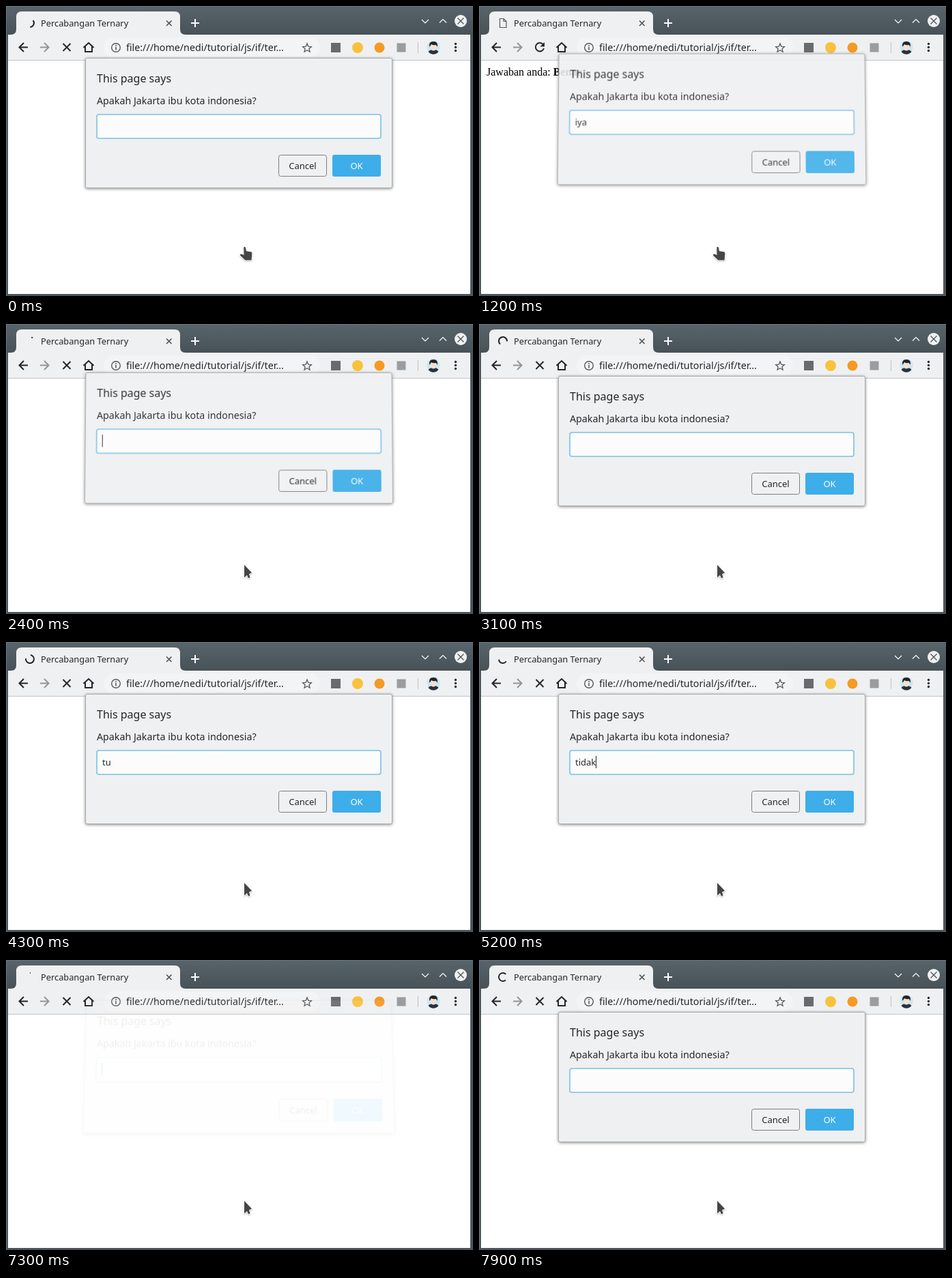
These frames come from a looping animation (684x425 px, 8 s). An HTML page:

```html
<!DOCTYPE html>
<html lang="id">
<head>
<meta charset="utf-8">
<title>Percabangan Ternary</title>
<style>
  html, body { margin: 0; width: 100%; height: 100%; overflow: hidden; background: #fff; }
  svg { position: absolute; left: 0; top: 0; width: 684px; height: 425px; }
  text { font: 13px "Noto Sans", sans-serif; fill: #232629; white-space: pre; }
  .medium { font-size: 14.25px; }
  .page { font: 16px "Liberation Serif", serif; fill: #000; }
  .page tspan { font-weight: bold; }
  .line { fill: none; stroke: #232629; stroke-width: 2; }
  #dialog { transform-origin: 341px 77px; }
</style>
</head>
<body>
<svg viewBox="0 0 684 425">
  <defs>
    <linearGradient id="bar" x2="0" y2="1">
      <stop stop-color="#58646b"/><stop offset="1" stop-color="#475158"/>
    </linearGradient>
  </defs>
  <!-- window frame -->
  <path fill="#4a555c" d="M0 0H684V425H0z"/>
  <path fill="url(#bar)" d="M0 0H684V42H0z"/>
  <path fill="#6b767c" d="M0 0H684V1H0zM0 1H1V425H0z"/>
  <path fill="#fff" d="M3 79H680V422H3z"/>
  <path fill="#eff0f1" d="M3 42H680V79H3zM7 42q8 0 8-8V16q0-8 8-8H247q8 0 8 8V34q0 8 8 8z"/>
  <path fill="#c3c5c6" d="M3 79H680V80H3z"/>
  <g class="line" style="stroke:#fcfcfc">
    <path d="M271 25H283M277 19V31"/>
    <path stroke-width="1" style="stroke-width:1.2" d="M609 20l5 5 5-5M635 24.500l5-5 5 5"/>
  </g>
  <circle cx="666" cy="22" r="9" fill="#eff0f1"/>
  <path class="line" style="stroke:#475057;stroke-width:1.2" d="M661.500 17.500l9 9m0-9l-9 9"/>

  <!-- tab -->
  <text x="51" y="30" style="font-size:12.8px">Percabangan Ternary</text>
  <path class="line" style="stroke:#4d5256;stroke-width:1.6" d="M235 21.500l7.500 7.500m0-7.500l-7.500 7.500"/>
  <path id="spinner" class="line"/>
  <path id="favicon" class="line" style="stroke:#55595c;stroke-width:1.2" d="M30.500 18.500H36L40 22.500V31.500H30.500zM36 18.500V22.500H40"/>

  <!-- toolbar -->
  <rect x="143" y="46" width="317" height="30" rx="15" fill="#f3f4f5"/>
  <path class="line" d="M32 60.500H20M26 54l-6.500 6.500L26 67"/>
  <path class="line" style="stroke:#939698" d="M50 60.500H62M56 54l6.500 6.500L56 67"/>
  <path id="stop" class="line" d="M83.500 55l11 11m0-11l-11 11"/>
  <g id="reload">
    <path class="line" d="M94 56.500A6.200 6.200 0 1 0 95 62"/>
    <path fill="#232629" d="M96 53V59.500H89.500z"/>
  </g>
  <path class="line" d="M113.500 61l7.500-7 7.500 7M116 59.500V67H126V59.500"/>
  <circle class="line" cx="161" cy="61" r="6.300" style="stroke:#55595c;stroke-width:1.4"/>
  <path fill="#55595c" d="M160.200 57.300h1.600v1.600h-1.600zM160.200 60h1.600v4.500h-1.600z"/>
  <text class="medium" x="176" y="66">file:///home/nedi/tutorial/js/if/ter…</text>
  <path class="line" style="stroke:#55595c;stroke-width:1.300" d="M441 55l1.800 4.300 4.600.4-3.500 3 1.100 4.500-4-2.400-4 2.400 1.100-4.500-3.500-3 4.600-.4z"/>
  <rect x="476" y="54" width="14" height="14" fill="#686b6e"/>
  <circle cx="515" cy="61" r="8" fill="#f9c23c"/>
  <circle cx="547" cy="61" r="7.500" fill="#f59a23"/>
  <rect x="572.500" y="54.500" width="13" height="13" fill="#9a9c9e"/>
  <path fill="#bfc1c3" d="M603 53h1V69h-1z"/>
  <circle cx="626" cy="60.500" r="9.500" fill="#c9e8f3"/>
  <path fill="#263241" d="M618.500 67q2-3 7.500-3t7.500 3a9.500 9.500 0 0 1-15 0z"/>
  <ellipse cx="626" cy="60" rx="4.700" ry="5.500" fill="#f5dfd0"/>
  <path fill="#20242a" d="M620.500 60q-2-8 5.500-8 7.500 0 5.500 8l-1.500-3q-5 1-7-1z"/>
  <g fill="#232629">
    <circle cx="658.500" cy="55.500" r="1.700"/><circle cx="658.500" cy="60.500" r="1.700"/><circle cx="658.500" cy="65.500" r="1.700"/>
  </g>

  <text id="result" class="page" x="11" y="102">Jawaban anda: <tspan id="answer"></tspan></text>

  <g fill="#454545" stroke="#fff" stroke-width="1.500" paint-order="stroke" style="filter:drop-shadow(0 1px 1px #0004)">
    <path id="arrow" d="M349 353V371.500L353 368 355 372.500 357.500 371.500 356 366.500 360 364.500z"/>
    <path id="hand" d="M348.300 353.500c1-1 2.400-.6 2.600.6l1 5.200 6.500 1c1.500.3 2 1.200 1.900 2.600l-.8 9.600h-9.200l-7-6.800c-1-1 0-2.600 1.600-2.200l3.600 1.400z"/>
  </g>
</svg>

<svg id="dialog" viewBox="0 0 684 425">
  <rect x="116.500" y="76.500" width="449" height="190" rx="2.500" fill="#eff0f1" stroke="#a9abad" style="filter:drop-shadow(0 1px 2px #0007)"/>
  <text x="133" y="112" style="font-size:16px">This page says</text>
  <text class="medium" x="133" y="144">Apakah Jakarta ibu kota indonesia?</text>
  <rect x="133" y="159" width="416" height="35" rx="3" fill="#fcfcfc" stroke="#79c1e8" stroke-width="1.600"/>
  <text id="typed" x="141" y="181"></text>
  <path id="caret" fill="#232629" d="M0 167h1V185h-1z"/>
  <rect x="399.500" y="218.500" width="70" height="31" rx="3" fill="#f0f1f2" stroke="#7c7f81"/>
  <text x="434.500" y="239" text-anchor="middle">Cancel</text>
  <rect x="478" y="218" width="71" height="32" rx="3" fill="#3daee9"/>
  <text x="513.500" y="239" text-anchor="middle" style="fill:#fcfcfc">OK</text>
</svg>

<script>
const LOOP = 8000, GLIDE = 200, BLINK = 500;
const $ = id => document.getElementById(id);
const show = (id, on) => $(id).style.display = on ? '' : 'none';

// One visit per page load: the prompt opens, keys are typed, the prompt closes.
const visits = [
  { open: -6885, close: 1150, answer: 'Benar', hand: true,
    keys: [[300, 'i'], [500, 'iy'], [600, 'iya']] },
  { open: 2300, close: 5250, answer: 'Salah',
    keys: [[3700, 't'], [3800, 'tu'], [4400, 't'], [4600, 'ti'], [4700, 'tid'], [4800, 'tida'], [4900, 'tidak']] },
  { open: 7300, close: Infinity, keys: [] }
];

const holds = [[2400, 2900], [4100, 4300], [5200, 5400], [5400, 5600]];
function recordedTime(t) {
  const hold = holds.find(([from, to]) => t >= from && t < to);
  return hold ? hold[0] : Math.floor(t / 100) * 100;
}

// cubic-bezier(.4, 0, .2, 1), solved by bisection
function fastOutSlowIn(x) {
  let lo = 0, hi = 1;
  for (let i = 0; i < 16; i++) {
    const u = (lo + hi) / 2, v = 1 - u;
    if (1.2 * v * v * u + .6 * v * u * u + u ** 3 < x) lo = u; else hi = u;
  }
  return 3 * (1 - lo) * lo * lo + lo ** 3;
}

function drawSpinner(elapsed) {
  const sweep = 666, max = 270;
  const base = -90 + 360 * elapsed / 1568 + max * Math.floor(elapsed / (2 * sweep));
  const grown = max * fastOutSlowIn(elapsed % sweep / sweep);
  const growing = Math.floor(elapsed / sweep) % 2 === 0;
  const from = growing ? base : base + Math.min(grown, max - 8);
  const to = growing ? base + Math.max(grown, 8) : base + max;
  const point = deg => {
    const a = deg * Math.PI / 180;
    return `${35 + 6 * Math.cos(a)} ${25 + 6 * Math.sin(a)}`;
  };
  $('spinner').setAttribute('d', `M${point(from)}A6 6 0 ${+(to - from > 180)} 1 ${point(to)}`);
}

// tilt 0: at rest, 1: swung up and nearly transparent
function drawDialog(tilt) {
  const { style } = $('dialog');
  style.opacity = 1 - .92 * tilt ** 2.2;
  style.transform = tilt
    ? `translateY(${-17 * tilt}px) matrix3d(${1 - .0075 * tilt},0,0,0, 0,1,0,${-.00012 * tilt}, 0,0,1,0, 0,0,0,1)`
    : 'none';
}

function draw(t) {
  const visit = visits.filter(v => v.open <= t).pop();
  const loading = t < visit.close;
  const visible = t < visit.close + GLIDE;

  for (const id of ['spinner', 'stop']) show(id, loading);
  for (const id of ['favicon', 'reload', 'result']) show(id, !loading);
  const hand = visit.hand || !loading;
  show('hand', hand);
  show('arrow', !hand);
  show('dialog', visible);
  $('answer').textContent = visit.answer || '';
  if (loading) drawSpinner(t - visit.open);
  if (!visible) return;

  const [keyTime, text] = visit.keys.filter(([at]) => at <= t).pop() || [visit.open, ''];
  $('typed').textContent = text;
  const width = text ? Math.round($('typed').getComputedTextLength()) : 0;
  $('caret').setAttribute('transform', `translate(${141 + width})`);
  show('caret', Math.floor((t - keyTime) / BLINK) % 2 === 0);

  drawDialog(loading
    ? Math.max(0, 1 - (t - visit.open) / GLIDE) ** 1.74
    : ((t - visit.close) / GLIDE) ** .7);
}

function tick() {
  draw(recordedTime(performance.now() % LOOP));
  requestAnimationFrame(tick);
}
tick();
</script>
</body>
</html>
```
